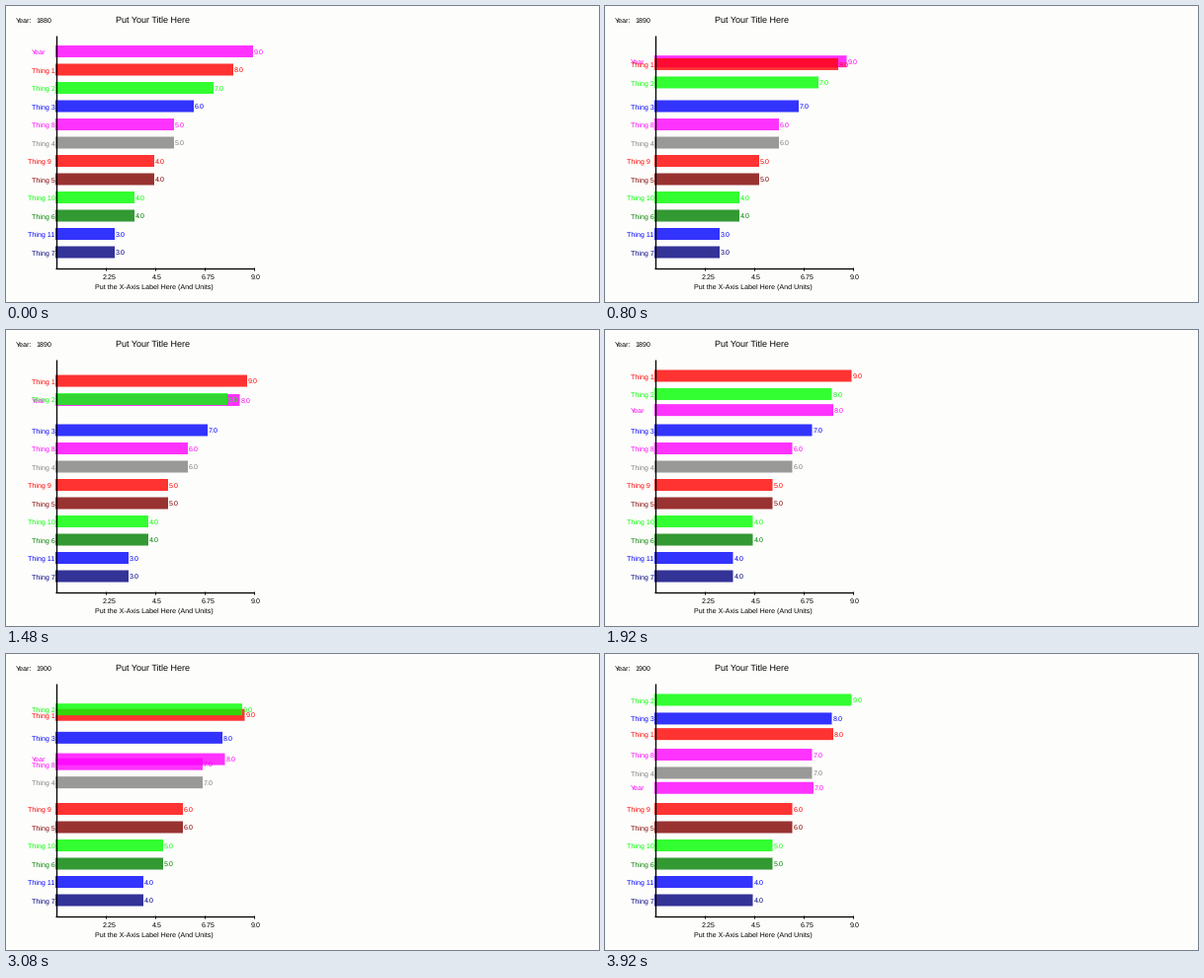
These frames come from a looping animation (600x300 px, 4000 ms). A matplotlib script:

```python
import matplotlib.pyplot as plt
from matplotlib.animation import FuncAnimation
from matplotlib.patches import Rectangle

W, H, DPI = 600, 300, 100
plt.rcParams.update({
    "font.family": "Liberation Sans",
    "text.hinting": "none",
    "toolbar": "None",
})

LEFT, FLOOR = 50, 265          # chart origin
TOP, ROW, THICK = 46, 18.5, 12  # first bar centre, row pitch, bar height
LENGTH, PEAK = 200, 9           # axis length in pixels and its value
UNIT = 20                       # pixels a bar gains or loses per decade
STEPS = 40                      # steps in one transition
SMALL, BIG = 7.15, 9.05

# name, colour, starting length in units, rank in each of the three decades
ROWS = [
    ("Year", "magenta", 10, (0, 2, 5)),
    ("Thing 1", "red", 9, (1, 0, 2)),
    ("Thing 2", "lime", 8, (2, 1, 0)),
    ("Thing 3", "blue", 7, (3, 3, 1)),
    ("Thing 4", "gray", 6, (5, 5, 4)),
    ("Thing 5", "maroon", 5, (7, 7, 7)),
    ("Thing 6", "green", 4, (9, 9, 9)),
    ("Thing 7", "navy", 3, (11, 11, 11)),
    ("Thing 8", "magenta", 6, (4, 4, 3)),
    ("Thing 9", "red", 5, (6, 6, 6)),
    ("Thing 10", "lime", 4, (8, 8, 8)),
    ("Thing 11", "blue", 3, (10, 10, 10)),
]
WIDE_NAMES = ("Thing 9", "Thing 10", "Thing 11")

fig = plt.figure(figsize=(W / DPI, H / DPI), dpi=DPI, facecolor="#fdfdfb")
ax = fig.add_axes([0, 0, 1, 1])
ax.set_xlim(0, W)
ax.set_ylim(H, 0)
ax.axis("off")


def label(x, base, text, size=SMALL, color="black", z=50):
    return ax.text(x, base, text, size=size * 72 / DPI, color=color,
                   ha="left", va="baseline", zorder=z)


def line(x0, y0, x1, y1, width=1.3):
    ax.plot([x0, x1], [y0, y1], color="black", lw=width * 72 / DPI,
            solid_capstyle="butt", zorder=60)


class Bar:
    def __init__(self, z, name, color, units, ranks):
        self.ranks = ranks
        self.start = units * UNIT
        self.rect = Rectangle((LEFT, 0), 0, THICK, facecolor=color, alpha=0.8,
                              linewidth=0, zorder=z, snap=False)
        ax.add_patch(self.rect)
        x = 22 if name in WIDE_NAMES else 26
        self.name = label(x, 0, name, color=color, z=z + 0.1)
        self.value = label(0, 0, "", color=color, z=z + 0.2)

    def place(self, tick):
        size, rank = self.start, self.ranks[0]
        for decade in range(2):
            change = self.ranks[decade + 1] - self.ranks[decade]
            falling = change > 0
            # falling bars trail the rest by one step
            part = progress(tick - 30 * decade, lag=int(falling))
            size += (-UNIT if falling else UNIT) * part
            rank += change * part
        mid = TOP + ROW * rank
        self.rect.set_y(mid - THICK / 2)
        self.rect.set_width(size)
        self.name.set_y(mid + 2.6)
        self.value.set_position((LEFT + size + 1, mid + 2.6))
        self.value.set_text(f"{round(size * PEAK / LENGTH):.1f}")


def progress(tick, lag):
    step = 4 * (2 * tick - 9) // 5 - lag
    return min(max(step, 0), STEPS) / STEPS


label(111, 17.2, "Put Your Title Here", BIG)
label(90, 286.5, "Put the X-Axis Label Here (And Units)")
label(10, 16.6, "Year:", 7.2)
year = label(30, 16.6, "1880", 7.2)

line(LEFT + 0.5, 30, LEFT + 0.5, FLOOR + 1)
line(LEFT, FLOOR + 0.5, LEFT + LENGTH + 1, FLOOR + 0.5)
for n in range(1, 5):
    x = LEFT + LENGTH * n / 4
    line(x + 0.5, FLOOR, x + 0.5, FLOOR + 3, 1)
    label(x - 2.5, 276.6, str(PEAK * n / 4))

bars = [Bar(z, *row) for z, row in enumerate(ROWS, 1)]


def draw(frame):
    tick = (3 * frame + 1) // 5  # 15 pictures a second on a 40 ms grid
    year.set_text(str(1880 + 10 * ((tick + 25) // 30)))
    for bar in bars:
        bar.place(tick)
    return [year]


anim = FuncAnimation(fig, draw, frames=100, interval=40, repeat=True,
                     repeat_delay=0, init_func=lambda: draw(0), blit=False)
plt.show()
```
